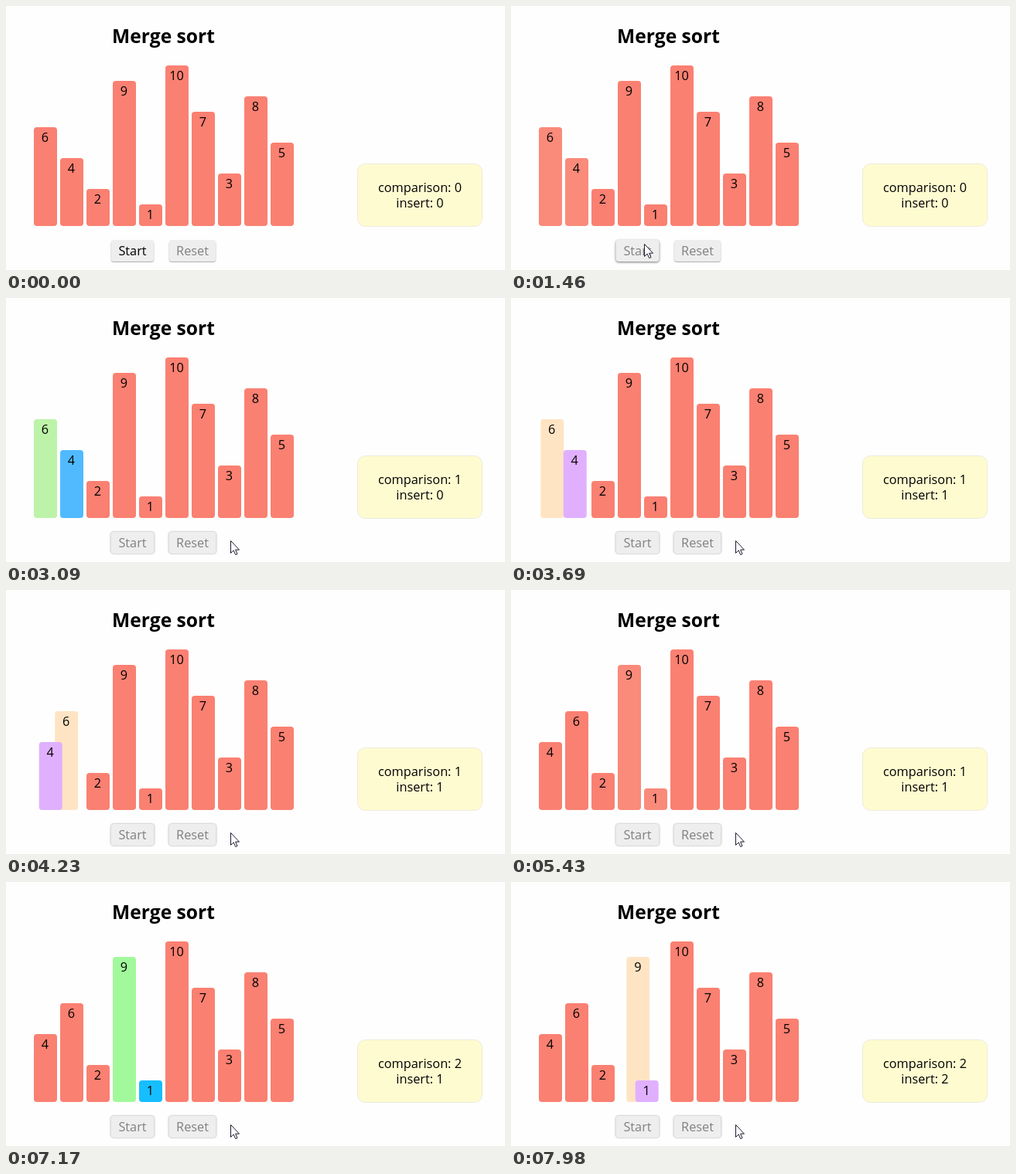
These frames come from a looping animation (645 px wide and 342 px high, 8000 ms). An HTML page:

```html
<!DOCTYPE html>
<html lang="en">
<head>
<meta charset="utf-8">
<title>Merge sort</title>
<style>
  html, body { margin: 0; width: 100%; height: 100%; overflow: hidden; background: #fefefe; }
  svg { display: block; width: 645px; height: 342px; }
  text { font: 16.3px "Open Sans", "Noto Sans", sans-serif; text-anchor: middle; }
  .title { font-size: 24.6px; font-weight: 700; }
</style>
</head>
<body>
<svg id="stage" viewBox="0 0 645 342" xmlns="http://www.w3.org/2000/svg"></svg>
<script>
const LOOP = 8000;
const VALUES = [6, 4, 2, 9, 1, 10, 7, 3, 8, 5];
const SALMON = [250, 128, 114], BISQUE = [255, 228, 196], GREEN = [152, 251, 152],
      BLUE = [0, 191, 255], MAUVE = [224, 176, 255];

const stage = document.getElementById('stage');

function add(tag, attrs, parent = stage, text = '') {
  const node = document.createElementNS('http://www.w3.org/2000/svg', tag);
  for (const key in attrs) node.setAttribute(key, attrs[key]);
  node.textContent = text;
  parent.appendChild(node);
  return node;
}

const clamp = x => Math.min(1, Math.max(0, x));
const mix = (a, b, k) => a + (b - a) * k;
const swing = x => 0.5 - Math.cos(clamp(x) * Math.PI) / 2;

// CSS "ease": cubic-bezier(.25, .1, .25, 1), solved by bisection
function ease(x) {
  if (x <= 0) return 0;
  if (x >= 1) return 1;
  const bezier = (p, q, s) => 3 * p * s * (1 - s) ** 2 + 3 * q * s * s * (1 - s) + s ** 3;
  let lo = 0, hi = 1;
  for (let i = 0; i < 20; i++) {
    const mid = (lo + hi) / 2;
    if (bezier(0.25, 0.25, mid) < x) lo = mid; else hi = mid;
  }
  return bezier(0.1, 1, lo);
}

// Each fade: [start, duration, color]
function colorAt(t, fades) {
  let color = SALMON;
  for (const [start, length, next] of fades) {
    const k = ease((t - start) / length);
    color = color.map((c, i) => mix(c, next[i], k));
  }
  return `rgb(${color.map(Math.round)})`;
}

// Each merge swaps the bars at index `at` and `at + 1`
const merges = [
  { at: 0, pick: 1430, compare: 2290, mark: 3022, move: 3525, done: 4930 },
  { at: 3, pick: 5400, compare: 6235, mark: 7140, move: 7590, done: LOOP + 1000 }
];

function fadesFor(m, isRight) {
  return [
    [m.pick, 300, BISQUE],
    [m.compare, 300, isRight ? BLUE : GREEN],
    [m.mark, 300, isRight ? MAUVE : BISQUE],
    [m.done, 180, SALMON]
  ];
}

add('text', { x: 203.5, y: 48, class: 'title' }, stage, 'Merge sort');

const bars = VALUES.map((value, i) => {
  const height = 8 + 20 * value, top = 285 - height;
  const group = add('g', {});
  const rect = add('rect', { y: top, width: 30, height, rx: 4 }, group);
  add('text', { x: 14.5, y: top + 19 }, group, value);
  const merge = merges.find(m => i === m.at || i === m.at + 1);
  const isRight = merge && i > merge.at;
  return { group, rect, x: 36 + 34 * i, merge, shift: isRight ? -34 : 34,
           fades: merge ? fadesFor(merge, isRight) : [] };
});

add('rect', { x: 454.5, y: 204.5, width: 161, height: 81, rx: 10, fill: '#fffbd0', stroke: '#ecebdc' });
const comparisonText = add('text', { x: 535, y: 241 });
const insertText = add('text', { x: 535, y: 261 });

function button(x, width, label) {
  const rect = add('rect', { x, y: 303, width, height: 28, rx: 4, fill: '#eee' });
  const text = add('text', { x: x + width / 2, y: 323, fill: '#808080' }, stage, label);
  return { rect, text };
}
const startButton = button(135.5, 56, 'Start');
const resetButton = button(210.5, 61, 'Reset');

const SHADOWS = {
  rest: '0 1px 0.5px rgba(0,0,0,.3)',
  hover: '0 1px 1.5px rgba(0,0,0,.55)',
  left: '0 0.5px 1px rgba(0,0,0,.4)'
};
const setShadow = (b, state) => { b.rect.style.filter = `drop-shadow(${SHADOWS[state]})`; };

const cursor = add('path', {
  d: 'M.5 .5V16.5L4.2 13L6.7 18.6L9 17.6L6.6 12.2H11.5Z',
  fill: '#fff', stroke: '#1c1c30', 'stroke-linejoin': 'round'
});

// Pointer stops: [time, x, y]
const pointer = [
  [480, 156, 344], [740, 172, 308], [2170, 172, 308],
  [2280, 197, 314], [2600, 268, 314], [2890, 290, 314]
];

function pointerAt(t) {
  const next = pointer.findIndex(p => p[0] > t);
  if (next === 0) return pointer[0].slice(1);
  if (next < 0) return pointer[pointer.length - 1].slice(1);
  const a = pointer[next - 1], b = pointer[next];
  const k = (t - a[0]) / (b[0] - a[0]);
  return [mix(a[1], b[1], k), mix(a[2], b[2], k)];
}

function render(t) {
  for (const bar of bars) {
    const moved = bar.merge ? swing((t - bar.merge.move) / 1000) * bar.shift : 0;
    bar.group.setAttribute('transform', `translate(${bar.x + moved} 0)`);
    bar.rect.setAttribute('fill', colorAt(t, bar.fades));
  }

  const count = key => merges.filter(m => t >= m[key]).length;
  comparisonText.textContent = `comparison: ${count('compare')}`;
  insertText.textContent = `insert: ${count('move')}`;

  startButton.text.setAttribute('fill', t < 1450 ? '#000' : '#808080');
  setShadow(startButton, t < 620 ? 'rest' : t < 2300 ? 'hover' : 'left');
  setShadow(resetButton, t < 2340 ? 'rest' : t < 2620 ? 'hover' : 'left');

  const [x, y] = pointerAt(t).map(Math.round);
  cursor.setAttribute('transform', `translate(${x} ${y})`);
}

function tick() {
  render(performance.now() % LOOP);
  requestAnimationFrame(tick);
}
tick();
</script>
</body>
</html>
```
